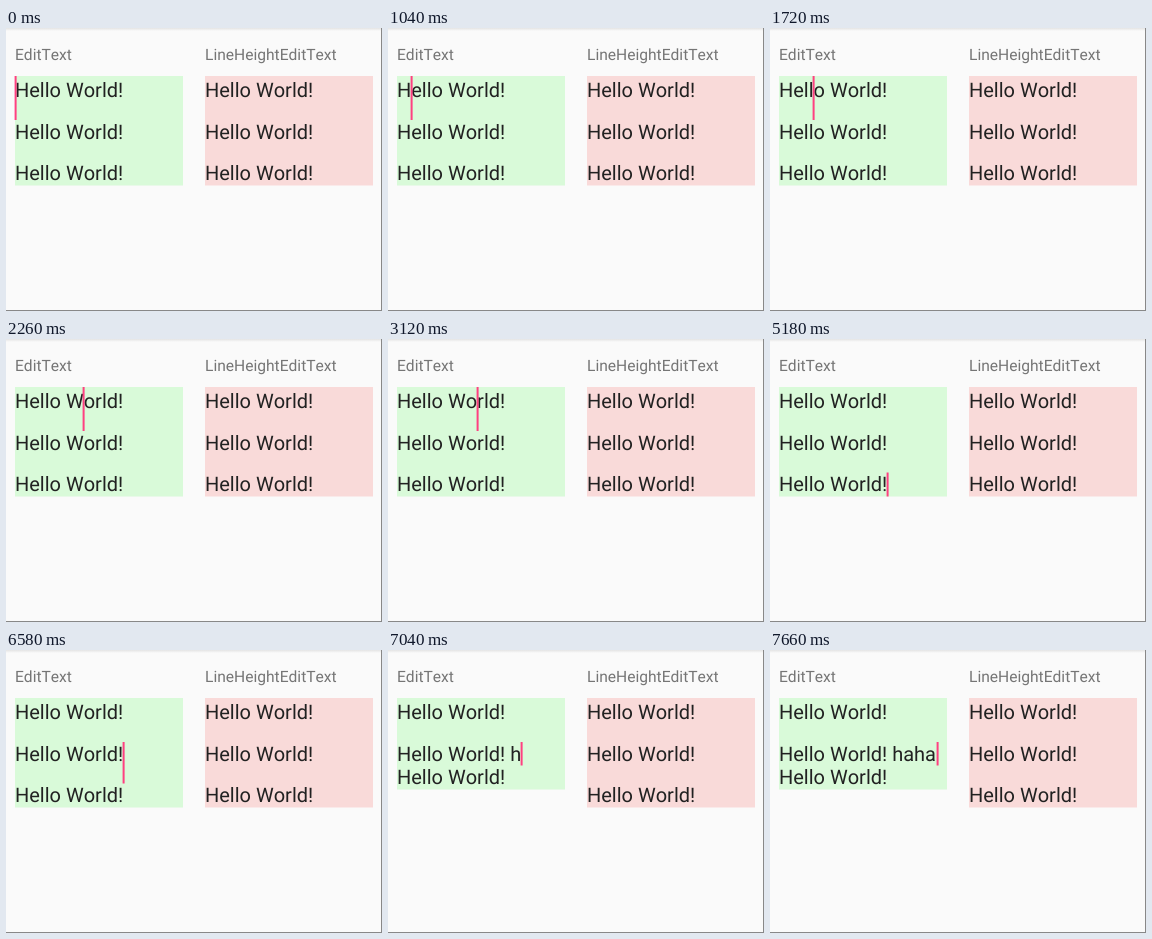
These frames come from a looping animation (376 by 283 pixels, 8000 ms). An HTML page:

```html
<!DOCTYPE html>
<html lang="en">
<head>
<meta charset="utf-8">
<title>Line height caret</title>
<style>
  html, body { margin: 0; width: 100%; height: 100%; overflow: hidden; background: #fafafa; }
  svg { display: block; width: 376px; height: 283px; }
  text { font-family: Roboto, sans-serif; font-size: 20px; font-kerning: none; fill: #212121;
         text-rendering: geometricPrecision; white-space: pre; }
  .label { font-size: 15.6px; fill: #757575; }
  #caret, #field, #last, #typed { animation: 8s step-end infinite; }
  #caret { animation-name: caret; fill: #ff4081; }
  #field { animation-name: field; }
  #last  { animation-name: last; }
  #typed { animation-name: typed; }

  /* Blinks, then steps through the text one letter or line at a time */
  @keyframes caret {
    0%      { x: 8px; y: 48px; height: 44px; opacity: 1; }
    5.625%  { opacity: 0; }
    11.875% { opacity: 1; }
    13%     { x: 22px; }
    16.5%   { x: 33px; }
    19.125% { x: 38px; }
    21.5%   { x: 42px; }
    23.875% { x: 54px; }
    26%     { x: 59px; }
    28.25%  { x: 76px; }
    30.25%  { x: 88px; }
    32.5%   { x: 95px; }
    39%     { x: 88px; }
    42.875% { y: 92px; height: 41.5px; }
    49.5%   { opacity: 0; }
    50.5%   { x: 95px; opacity: 1; }
    55.5%   { y: 133.5px; height: 24px; }
    60.5%   { x: 99px; }
    62.875% { x: 111px; }
    64.75%  { x: 116px; }
    69.875% { y: 92px; height: 41.5px; }
    76%     { opacity: 0; }
    82.25%  { opacity: 1; }
    83.75%  { x: 121px; height: 23.5px; }
    88%     { x: 132px; }
    89.875% { x: 144px; }
    93%     { x: 155px; }
    95.75%, 100% { x: 166px; y: 92px; height: 23.5px; opacity: 1; }
  }
  /* Typing makes the line spacing collapse */
  @keyframes field {
    0% { height: 109.5px; }
    83.75%, 100% { height: 91.5px; }
  }
  @keyframes last {
    0% { transform: translateY(0); }
    83.75%, 100% { transform: translateY(-18px); }
  }
  @keyframes typed {
    0% { width: 121px; }
    88% { width: 133.2px; }
    89.875% { width: 144.2px; }
    93% { width: 155.2px; }
    95.75%, 100% { width: 180px; }
  }
</style>
</head>
<body>
<svg viewBox="0 0 376 283">
  <defs>
    <linearGradient id="shade" x2="0" y2="1">
      <stop stop-color="#e4e4e4"/>
      <stop offset="1" stop-color="#fafafa"/>
    </linearGradient>
    <clipPath id="shown"><rect id="typed" y="85" width="121" height="40"/></clipPath>
  </defs>
  <rect width="376" height="283" fill="#fafafa"/>
  <rect width="376" height="3" fill="url(#shade)"/>
  <path d="M375 0h1v283H0v-1h375z" fill="#888"/>

  <text class="label" x="9" y="31.6">EditText</text>
  <text class="label" x="199" y="31.6">LineHeightEditText</text>

  <rect id="field" x="9" y="48" width="168" height="109.5" fill="#d9fad9"/>
  <text x="9" y="69.2">Hello World!</text>
  <text x="9" y="110.7" clip-path="url(#shown)">Hello World! haha</text>
  <text id="last" x="9" y="152.2">Hello World!</text>
  <g transform="translate(.6)"><rect id="caret" x="8" y="48" width="2" height="44"/></g>

  <rect x="199" y="48" width="168" height="109.5" fill="#f9dad9"/>
  <text x="199" y="69.2">Hello World!</text>
  <text x="199" y="110.7">Hello World!</text>
  <text x="199" y="152.2">Hello World!</text>
</svg>
</body>
</html>
```
